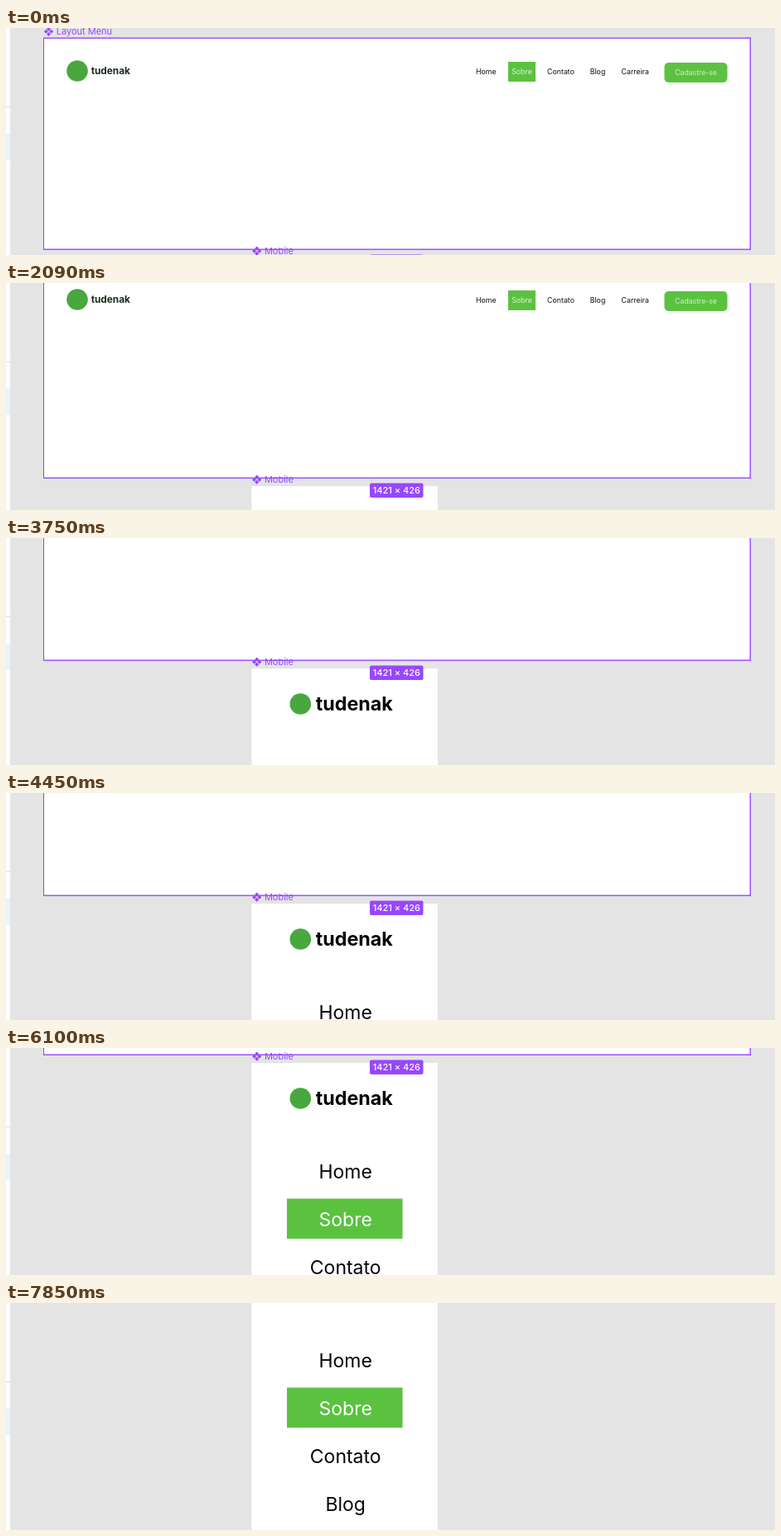
An HTML page with a canvas for the animation above (8000 ms loop, 928 by 275 pixels).

```html
<!DOCTYPE html>
<html lang="pt">
<head>
<meta charset="utf-8">
<title>Layout Menu</title>
<style>
  html, body { margin: 0; width: 100%; height: 100%; overflow: hidden; background: #e4e4e4; }
  canvas { display: block; }
</style>
</head>
<body>
<canvas id="stage" width="928" height="275"></canvas>
<script>
const ctx = document.getElementById('stage').getContext('2d');
const LOOP = 8000;
const PURPLE = '#9747ff';
const GREEN = '#5bc240';
const BRAND = 'tudenak';

// Wheel bursts: first step, last step (ms), step count, distance (px)
const bursts = [
  [1320, 1790, 3, 24],
  [2090, 3060, 7, 56],
  [3320, 3750, 4, 40],
  [4100, 5100, 7, 56],
  [5300, 6100, 8, 84],
  [6630, 7500, 6, 60],
  [7700, 7850, 2, 20]
];

function scrollAt(t) {
  let y = 0;
  for (const [start, end, steps, dist] of bursts) {
    if (t < start) break;
    const gap = (end - start) / (steps - 1);
    const done = Math.min(steps, Math.floor((t - start) / gap + 1e-6) + 1);
    y += dist * done / steps;
  }
  return Math.round(y);
}

function rect(x, y, w, h, color) {
  ctx.fillStyle = color;
  ctx.fillRect(x, y, w, h);
}

function pill(x, y, w, h, r, color) {
  ctx.fillStyle = color;
  ctx.beginPath();
  ctx.roundRect(x, y, w, h, r);
  ctx.fill();
}

function text(str, x, y, size, color, weight = 400, align = 'left') {
  ctx.font = `${weight} ${size}px Inter, "Liberation Sans", sans-serif`;
  ctx.textAlign = align;
  ctx.fillStyle = color;
  ctx.fillText(str, x, y);
}

function diamond(x, y, r) {
  ctx.moveTo(x, y - r);
  ctx.lineTo(x + r, y);
  ctx.lineTo(x, y + r);
  ctx.lineTo(x - r, y);
  ctx.closePath();
}

function label(str, x, y) {
  const cx = x + 5.5, d = 3.1, r = 2.5;
  ctx.fillStyle = PURPLE;
  ctx.beginPath();
  diamond(cx, y - d, r);
  diamond(cx + d, y, r);
  diamond(cx, y + d, r);
  diamond(cx - d, y, r);
  ctx.fill();
  text(str, x + 14.7, y + 4, 11, PURPLE);
}

function logo(cx, cy, textX, baseline, size, color) {
  ctx.fillStyle = '#48a83d';
  ctx.beginPath();
  ctx.arc(cx, cy, 12.8, 0, Math.PI * 2);
  ctx.fill();
  text(BRAND, textX, baseline, size, color, 700);
}

function desktop() {
  rect(45, 12, 854, 256, '#fff');
  logo(86, 52, 102.7, 56.3, 11.8, '#1c2a1c');

  rect(606, 41, 33, 24, GREEN);
  const items = [['Home', 579.3], ['Sobre', 622.5], ['Contato', 669.5], ['Blog', 714], ['Carreira', 759.3]];
  for (const [name, x] of items) {
    text(name, x, 56.2, 8.8, name === 'Sobre' ? '#dcf3d5' : '#111', 400, 'center');
  }
  pill(794.5, 42, 76, 24, 5, GREEN);
  text('Cadastre-se', 832.5, 56.7, 8.7, '#d2efc8', 400, 'center');
}

function mobile() {
  rect(296.5, 278.2, 224.5, 500, '#fff');
  logo(355.3, 321, 373.7, 329.3, 23.3, '#050505');

  rect(339, 442.5, 139.5, 48.5, GREEN);
  ['Home', 'Sobre', 'Contato', 'Blog', 'Carreira'].forEach((name, i) => {
    text(name, 409.7, 417.5 + i * 58, 23, i === 1 ? '#fff' : '#050505', 400, 'center');
  });
}

function selection() {
  rect(45, 12, 1, 256, '#75638f');
  rect(45, 11.5, 854, 1.4, PURPLE);
  rect(45, 267.5, 854, 1.4, PURPLE);
  rect(897.5, 11.5, 1.4, 257, PURPLE);
  pill(439, 274.5, 64.5, 17.5, 2, PURPLE);
  text('1421 × 426', 471.3, 287.3, 11, '#fff', 500, 'center');
}

function sidebar() {
  rect(0, 0, 5, 275, '#fff');
  rect(0, 95, 5, 1, '#dedede');
  rect(0, 128, 5, 32, '#e9f3fc');
}

function draw(t) {
  rect(0, 0, 928, 275, '#e4e4e4');
  ctx.save();
  ctx.translate(0, -scrollAt(t));
  desktop();
  mobile();
  label('Layout Menu', 46, 4.3);
  label('Mobile', 297.2, 270.2);
  selection();
  ctx.restore();
  sidebar();
}

const begin = performance.now();
function tick() {
  draw((performance.now() - begin) % LOOP);
  requestAnimationFrame(tick);
}
tick();
</script>
</body>
</html>
```
